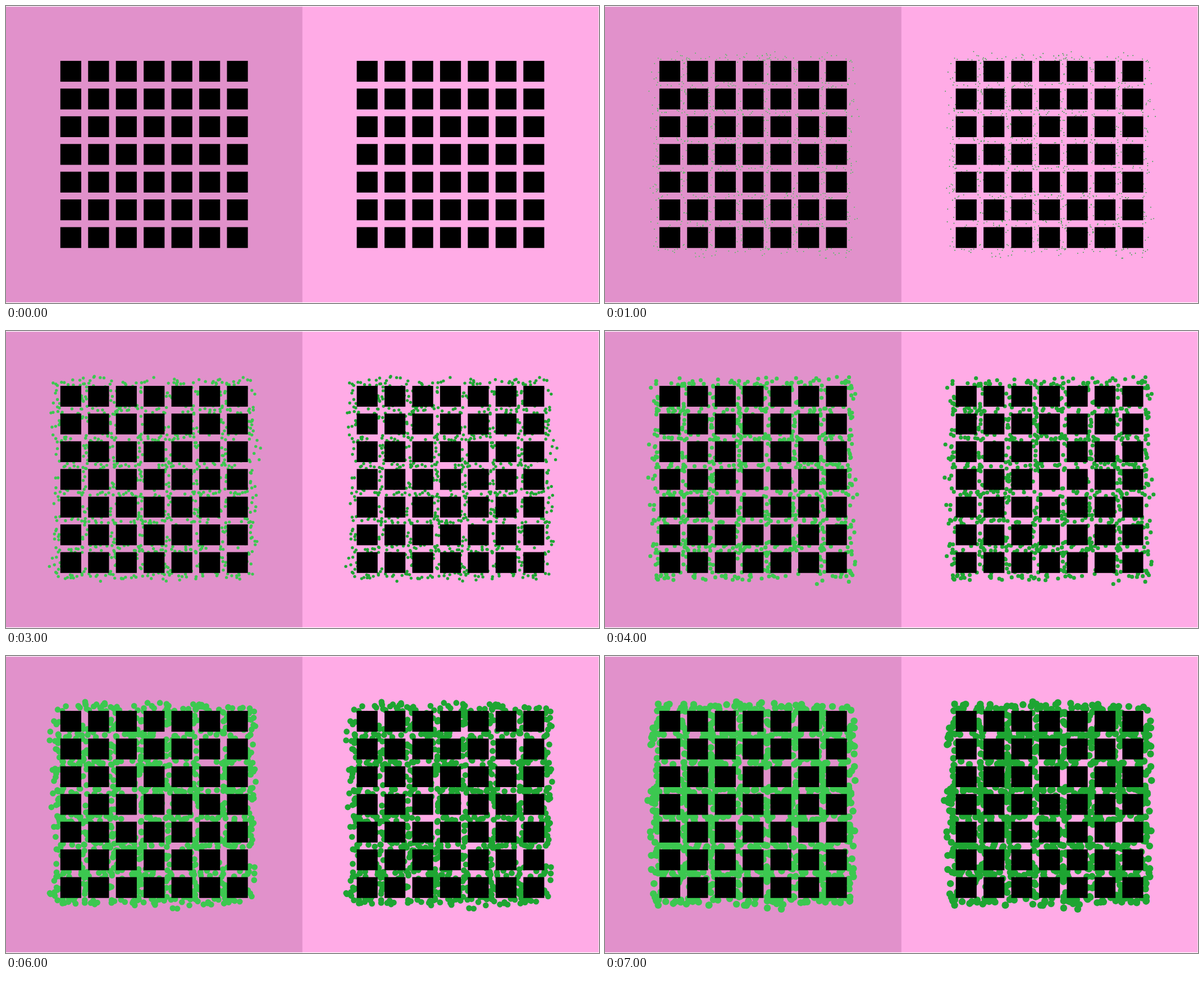
Write an HTML page with a canvas that moves like this. It is 1056 px wide and 530 px high and loops after 8 s.

```html
<!DOCTYPE html>
<html lang="en">
<head>
<meta charset="utf-8">
<title>Growing dots behind a grid</title>
<style>
html, body { margin: 0; width: 100%; height: 100%; overflow: hidden; background: #fff; }
canvas { display: block; }
</style>
</head>
<body>
<canvas id="stage" width="1056" height="530"></canvas>
<script>
const ctx = document.getElementById('stage').getContext('2d');
const STEP = 1000, STEPS = 8;
const TOP = 1.2, HEIGHT = 527.6;
const PITCH = 49.45, SQUARE = 37.2, COUNT = 7;
const X0 = 96.8, Y0 = 97.9;
const GAP = PITCH - SQUARE;
const PER_LINE = 57, SPREAD = 5.4, GROWTH = 0.89;
const PANELS = [
  { left: 0, width: 528, back: '#e191cb', dot: '#3cc850' },
  { left: 527.8, width: 527.6, back: '#ffabe6', dot: '#1ea532' }
];

function randomFrom(seed) {
  return () => {
    seed = (seed + 0x6d2b79f5) | 0;
    let n = Math.imul(seed ^ (seed >>> 15), 1 | seed);
    n = (n + Math.imul(n ^ (n >>> 7), 61 | n)) ^ n;
    return ((n ^ (n >>> 14)) >>> 0) / 4294967296;
  };
}

// Dots scatter around the lines between the squares, anew at every step.
function scatter(step) {
  const random = randomFrom(step * 977 + 5);
  const noise = () => {
    const g = Math.sqrt(-2 * Math.log(1 - random())) * Math.cos(2 * Math.PI * random());
    return SPREAD * Math.max(-3.2, Math.min(3.2, g));
  };
  const along = () => random() * COUNT * PITCH;
  const dots = [];
  for (let line = 0; line <= COUNT; line++) {
    const across = () => line * PITCH + noise();
    for (let i = 0; i < PER_LINE; i++) {
      dots.push([along(), across()], [across(), along()]);
    }
  }
  return dots.map(([x, y]) => [x + X0 - GAP / 2, y + Y0 - GAP / 2]);
}

const clouds = Array.from({ length: STEPS }, (_, step) => step ? scatter(step) : []);

function drawPanel({ left, width, back, dot }, step) {
  ctx.save();
  ctx.translate(left, 0);
  ctx.fillStyle = back;
  ctx.fillRect(0, TOP, width, HEIGHT);

  ctx.fillStyle = dot;
  for (const [x, y] of clouds[step]) {
    ctx.beginPath();
    ctx.arc(x, y, step * GROWTH, 0, 2 * Math.PI);
    ctx.fill();
  }

  ctx.fillStyle = '#000';
  for (let row = 0; row < COUNT; row++) {
    for (let col = 0; col < COUNT; col++) {
      ctx.fillRect(X0 + col * PITCH, Y0 + row * PITCH, SQUARE, SQUARE);
    }
  }
  ctx.restore();
}

function draw() {
  const step = Math.floor(performance.now() / STEP) % STEPS;
  ctx.clearRect(0, 0, 1056, 530);
  for (const panel of PANELS) drawPanel(panel, step);
  requestAnimationFrame(draw);
}
draw();
</script>
</body>
</html>
```
